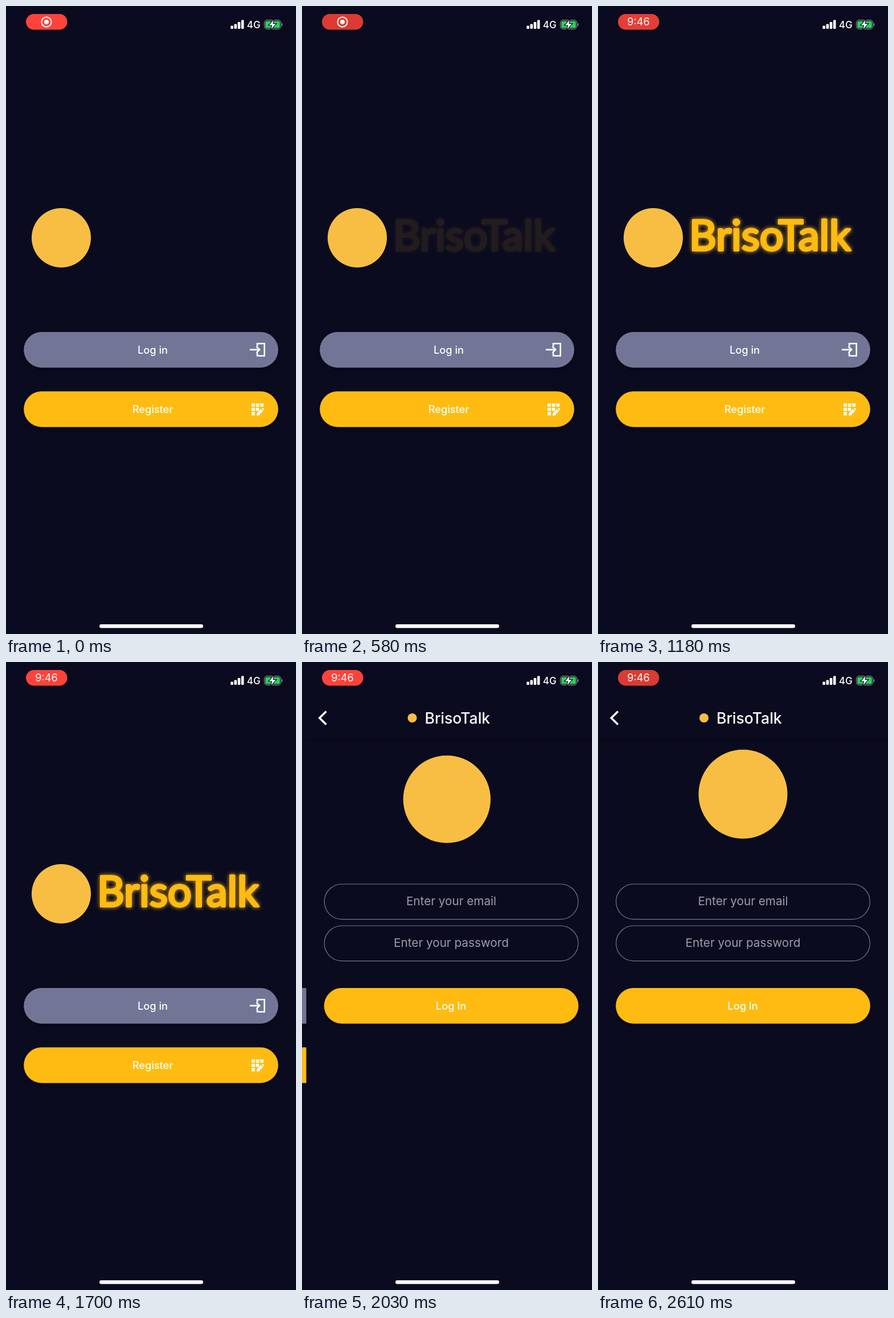
Write an HTML page with a canvas that moves like this. It is 509 px wide and 1100 px high and loops after 2.64 s.

```html
<!DOCTYPE html>
<html lang="en">
<head>
<meta charset="utf-8">
<title>Chat app welcome</title>
<style>
html, body { margin: 0; width: 100%; height: 100%; overflow: hidden; background: #0b0b20; }
canvas { display: block; width: 509px; height: 1100px; }
</style>
</head>
<body>
<canvas id="stage" width="509" height="1100"></canvas>
<script>
const W = 509, H = 1100, LOOP = 2640;
const NAME = 'BrisoTalk';
const BG = '#0b0b20', YELLOW = '#ffbb11', SLATE = '#737596', MARK = '#f8be44';
const ctx = document.getElementById('stage').getContext('2d');

const clamp = v => Math.min(1, Math.max(0, v));
const mix = (a, b, k) => a + (b - a) * k;

function bezier(x1, y1, x2, y2) {
  const at = (a, b, u) => 3 * (1 - u) * (1 - u) * u * a + 3 * (1 - u) * u * u * b + u * u * u;
  return x => {
    if (x <= 0) return 0;
    if (x >= 1) return 1;
    let lo = 0, hi = 1;
    for (let i = 0; i < 24; i++) {
      const mid = (lo + hi) / 2;
      if (at(x1, x2, mid) < x) lo = mid; else hi = mid;
    }
    return at(y1, y2, lo);
  };
}
const pageEase = bezier(0.35, 0.91, 0.33, 0.97);
const markEase = bezier(0.4, 0, 0.2, 1);

function bounceOut(t) {
  const k = 7.5625;
  if (t < 1 / 2.75) return k * t * t;
  if (t < 2 / 2.75) return k * (t - 1.5 / 2.75) ** 2 + 0.75;
  if (t < 2.5 / 2.75) return k * (t - 2.25 / 2.75) ** 2 + 0.9375;
  return k * (t - 2.625 / 2.75) ** 2 + 0.984375;
}
const bounceIn = t => 1 - bounceOut(1 - t);

function pill(x, y, w, h, r, fill) {
  ctx.beginPath();
  ctx.roundRect(x, y, w, h, r);
  if (fill) { ctx.fillStyle = fill; ctx.fill(); }
}

function disc(x, y, r, fill) {
  ctx.beginPath();
  ctx.arc(x, y, r, 0, Math.PI * 2);
  ctx.fillStyle = fill;
  ctx.fill();
}

function path(points, close) {
  ctx.beginPath();
  points.forEach(([x, y]) => ctx.lineTo(x, y));
  if (close) ctx.closePath();
}

function line(points, width, color = '#fff') {
  path(points);
  ctx.lineWidth = width;
  ctx.strokeStyle = color;
  ctx.stroke();
}

function label(str, x, y, size, weight = 400, color = '#fff', align = 'center') {
  ctx.font = `${weight} ${size}px Inter, sans-serif`;
  ctx.textAlign = align;
  ctx.fillStyle = color;
  ctx.fillText(str, x, y);
}

function button(str, x, y, color) {
  ctx.save();
  ctx.shadowColor = 'rgba(0,0,0,0.4)';
  ctx.shadowBlur = 6;
  ctx.shadowOffsetY = 3;
  pill(31.2, y, 446.6, 62.4, 31.2, color);
  ctx.restore();
  label(str, x, y + 37.5, 18.2, 500);
}

// The wordmark is rendered once so that its glow and strokes fade as one layer.
const wordmark = document.createElement('canvas');
wordmark.width = W;
wordmark.height = 120;
{
  const g = wordmark.getContext('2d');
  g.font = '400 74px Lato, sans-serif';
  g.fillStyle = g.strokeStyle = g.shadowColor = YELLOW;
  g.lineWidth = 4;
  g.lineJoin = 'round';
  g.shadowBlur = 7;
  g.strokeText(NAME, 160, 86.5);
  g.shadowBlur = 0;
  g.fillText(NAME, 160, 86.5);
}

function loginIcon() {
  line([[441, 596], [441, 591.3], [453.6, 591.3], [453.6, 612.8], [441, 612.8], [441, 608]], 2.6);
  line([[428, 602], [445, 602]], 2.6);
  line([[439.5, 596.5], [445, 602], [439.5, 607.5]], 2.6);
}

function registerIcon() {
  ctx.fillStyle = '#fff';
  [3, 2, 1].forEach((count, row) => {
    for (let col = 0; col < count; col++)
      ctx.fillRect(431 + col * 7.6, 696 + row * 7.6, 5.8, 5.8);
  });
  path([[440, 717.5], [440, 713.7], [447.5, 706.2], [451, 709.8], [443.5, 717.5]], true);
  ctx.fill();
  path([[448.6, 705.1], [450.2, 703.6], [453.6, 707], [452.1, 708.7]], true);
  ctx.fill();
}

function welcomePage(t) {
  ctx.globalAlpha = t < 1715 ? bounceIn(clamp((t - 103) / 800)) : 0;
  ctx.drawImage(wordmark, 0, 341);
  ctx.globalAlpha = 1;
  button('Log in', 257.5, 571, SLATE);
  loginIcon();
  button('Register', 257.5, 675, YELLOW);
  registerIcon();
}

function field(str, y) {
  pill(31.7, y, 445.6, 61.6, 30.8);
  ctx.lineWidth = 1.2;
  ctx.strokeStyle = SLATE;
  ctx.stroke();
  label(str, 254.5, y + 37, 20.7, 400, '#9d9da7');
}

function loginPage() {
  ctx.fillStyle = BG;
  ctx.fillRect(0, 0, W, H);
  const shade = ctx.createLinearGradient(0, 134, 0, 141);
  shade.addColorStop(0, 'rgba(0,0,0,0.28)');
  shade.addColorStop(1, 'rgba(0,0,0,0)');
  ctx.fillStyle = shade;
  ctx.fillRect(0, 134, W, 7);
  line([[35, 86.5], [23.3, 98], [35, 109.5]], 3.5);
  disc(186, 98, 8, MARK);
  label(NAME, 208, 108, 26.5, 500, '#fff', 'left');
  field('Enter your email', 389);
  field('Enter your password', 462);
  button('Log In', 254, 571, YELLOW);
}

function flyingMark(progress) {
  const angle = markEase(progress) * Math.PI / 2;
  const across = Math.sin(angle), up = 1 - Math.cos(angle);
  disc(mix(97, 254.5, across), mix(406, 231.5, up), 52 * (1 + up / 2), MARK);
}

function recordingPill(t) {
  const glow = clamp(0.5 + 0.75 * Math.cos((t - 1780) / 2050 * Math.PI * 2));
  const rgb = [mix(219, 254, glow), mix(59, 67, glow), mix(51, 58, glow)].map(Math.round);
  pill(35, 14, 72.5, 27.5, 13.75, `rgb(${rgb})`);
  ctx.globalAlpha = clamp((t - 750) / 330);
  label('9:46', 71, 34.2, 18.2);
  ctx.globalAlpha = 1 - clamp((t - 790) / 300);
  ctx.beginPath();
  ctx.arc(71, 28, 8.6, 0, Math.PI * 2);
  ctx.lineWidth = 2;
  ctx.strokeStyle = '#fff';
  ctx.stroke();
  disc(71, 28, 4, '#fff');
  ctx.globalAlpha = 1;
}

function statusBar(t) {
  recordingPill(t);
  [5.5, 8.5, 12, 15.5].forEach((h, i) => pill(394.3 + i * 6.2, 40 - h, 4.6, h, 1.3, '#fff'));
  label('4G', 434.7, 39, 17, 500);
  pill(453.5, 24.7, 29, 15.6, 5);
  ctx.lineWidth = 1.2;
  ctx.strokeStyle = '#85858f';
  ctx.stroke();
  pill(455.2, 26.4, 25.6, 12.2, 3.2, '#30d158');
  pill(483.8, 30, 1.6, 5.2, 0.8, '#85858f');
  path([[469.8, 24.5], [461.8, 33.4], [467.2, 33.4], [465.6, 40.5], [473.6, 31.2], [468.2, 31.2]], true);
  ctx.lineWidth = 2.4;
  ctx.strokeStyle = BG;
  ctx.stroke();
  ctx.fillStyle = '#fff';
  ctx.fill();
}

function draw() {
  const t = performance.now() % LOOP;
  const progress = clamp((t - 1791) / 310);
  const slide = pageEase(progress);
  ctx.fillStyle = BG;
  ctx.fillRect(0, 0, W, H);
  if (slide < 1) {
    ctx.save();
    ctx.translate(-slide * W / 3, 0);
    welcomePage(t);
    ctx.restore();
  }
  if (slide > 0) {
    ctx.save();
    ctx.translate((1 - slide) * W, 0);
    loginPage();
    ctx.restore();
  }
  flyingMark(progress);
  statusBar(t);
  pill(164, 1083, 182, 6.6, 3.3, '#fff');
  requestAnimationFrame(draw);
}
draw();
</script>
</body>
</html>
```
